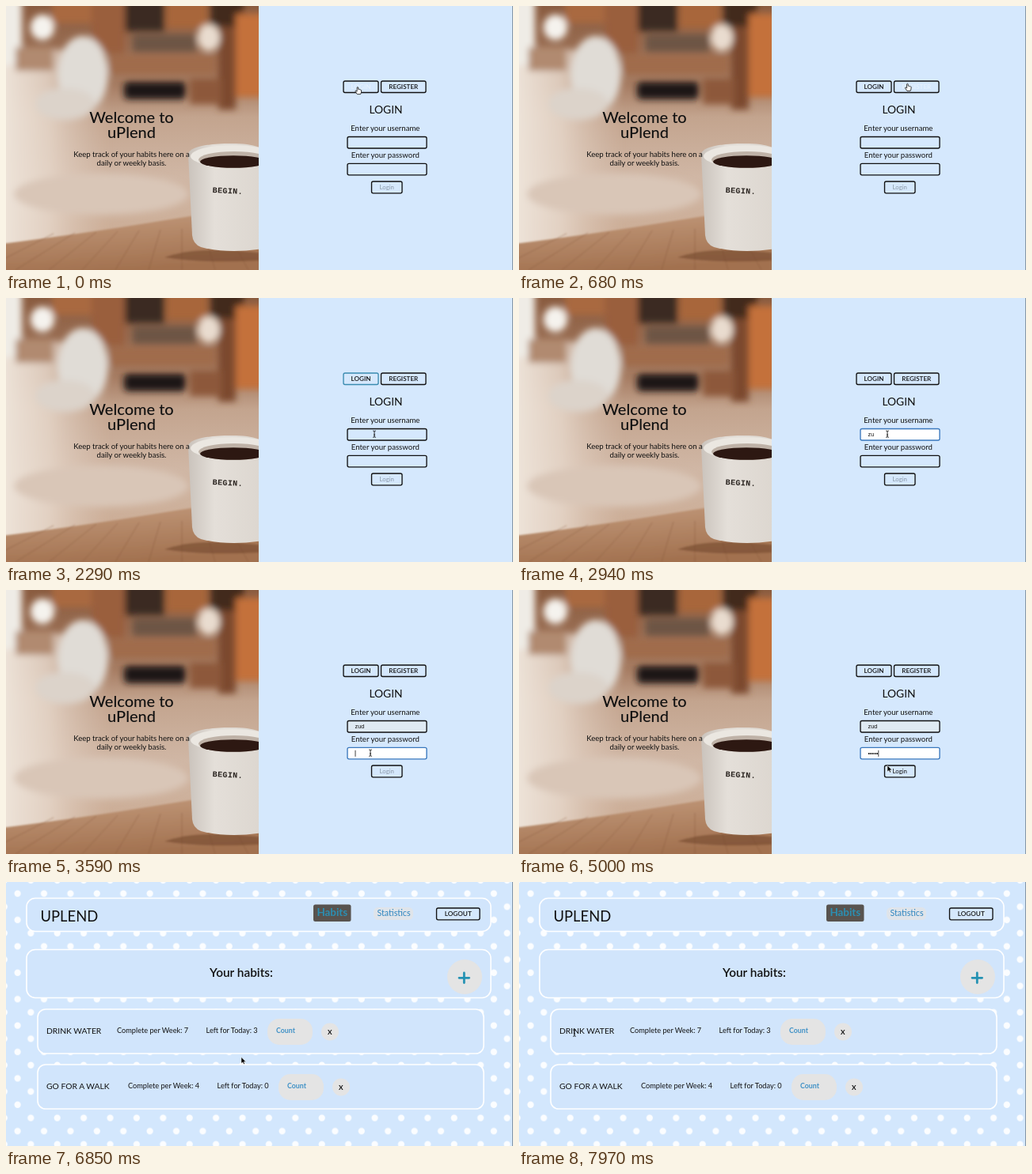
Write an HTML page that moves like this. It is 640 px wide and 334 px high and loops after 8 s.

```html
<!DOCTYPE html>
<html lang="en">
<head>
<meta charset="utf-8">
<title>Habit tracker</title>
<style>
  html, body { margin: 0; width: 100%; height: 100%; overflow: hidden; background: #d5e8fd; }
  svg { display: block; width: 100%; height: 100%; }
  text { font: 9.6px Lato, sans-serif; fill: #111; white-space: pre; }
  .mid { text-anchor: middle; }
  .medium { font-weight: 500; }
  .semi { font-weight: 600; }
  .bold { font-weight: 700; }
  .box { fill: #d5e8fd; stroke: #111; stroke-width: 1.35; }
  .card { fill: #d1e5fc; stroke: #fff; stroke-width: 1.6; }
  .chip { fill: #e4e4e4; }
  .mug { font: 700 10px "Liberation Mono", monospace; letter-spacing: .4px; fill: #29231f; }
  .value { font: 7.3px "Liberation Sans", sans-serif; }
</style>
</head>
<body>
<svg id="stage" viewBox="0 0 640 334" preserveAspectRatio="none"></svg>
<script>
const LOOP = 8000;
const stage = document.getElementById('stage');

const text = (x, y, str, size = 9.6, cls = 'mid', extra = '') =>
  `<text x="${x}" y="${y}" class="${cls}" style="font-size:${size}px;${extra}">${str}</text>`;
const rect = (x, y, w, h, r, cls, extra = '') =>
  `<rect x="${x}" y="${y}" width="${w}" height="${h}" rx="${r}" class="${cls}" ${extra}/>`;
const patch = (x, y, w, h, fill, r = 0) => rect(x, y, w, h, r, '', `fill="${fill}"`);
const oval = (x, y, rx, ry, fill) => `<ellipse cx="${x}" cy="${y}" rx="${rx}" ry="${ry}" fill="${fill}"/>`;
const group = (id, body, extra = '') => `<g id="${id}" ${extra}>${body}</g>`;
const button = (id, x, y, w, h, label, size, cls) =>
  group(id, rect(x, y, w, h, 2, 'box') + text(x + w / 2, y + h / 2 + 2.8, label, size, cls));
const field = (id, y) =>
  group(id, rect(431, y, 100, 14.5, 2, 'box') +
    `<text x="440.5" y="${y + 9.7}" class="value"></text>` +
    `<path class="caret" d="M0 ${y + 3.5}v8" stroke="#111" stroke-width=".8"/>`);

const defs = `<defs>
  <linearGradient id="room" x2="0" y2="1">
    <stop offset="0" stop-color="#8a5c40"/><stop offset=".3" stop-color="#a67c62"/>
    <stop offset=".42" stop-color="#c3a48e"/><stop offset=".65" stop-color="#d0b7a5"/>
    <stop offset="1" stop-color="#c9a78d"/>
  </linearGradient>
  <linearGradient id="haze">
    <stop offset="0" stop-color="#efe6dc"/><stop offset=".45" stop-color="#e6d7ca" stop-opacity=".85"/>
    <stop offset="1" stop-color="#dcc7b7" stop-opacity="0"/>
  </linearGradient>
  <linearGradient id="wood" x2=".3" y2="1">
    <stop offset="0" stop-color="#c39b7d"/><stop offset="1" stop-color="#a2714f"/>
  </linearGradient>
  <linearGradient id="china"><stop offset="0" stop-color="#cac3bc"/>
    <stop offset=".35" stop-color="#e4dfd9"/><stop offset="1" stop-color="#dcd6cf"/></linearGradient>
  <filter id="soft" x="-20%" y="-20%" width="140%" height="140%"><feGaussianBlur stdDeviation="4.5"/></filter>
  <filter id="slight"><feGaussianBlur stdDeviation="1.2"/></filter>
  <clipPath id="half"><path d="M0 0H319V334H0Z"/></clipPath>
  <pattern id="dots" x="6" y="6" width="33.4" height="33.4" patternUnits="userSpaceOnUse">
    <circle cx="8.6" cy="8.6" r="4.1" fill="#fbfdff"/><circle cx="25.3" cy="25.3" r="4.1" fill="#fbfdff"/>
  </pattern>
</defs>`;

const grain = Array.from({ length: 9 }, (_, i) =>
  `<path d="M${i * 42 - 30} 334L${60 + i * 27} ${288 - i}" stroke="#815235" stroke-opacity=".45"/>`).join('');

const photo = `<g clip-path="url(#half)">${patch(0, 0, 319, 334, 'url(#room)')}
  <g filter="url(#soft)">
    ${patch(-10, 55, 140, 290, 'url(#haze)')}
    ${patch(-10, -10, 30, 85, '#efece6')}${oval(46, 27, 15, 16, '#f5f3ee')}
    ${patch(58, -10, 52, 32, '#a9693f')}${patch(12, 52, 48, 30, '#b18a70')}
    ${patch(108, -10, 42, 70, '#9a5f3c')}${patch(150, -10, 50, 42, '#3a2a23')}
    ${patch(202, -10, 52, 38, '#a8663a')}${patch(160, 36, 80, 22, '#6d5545')}
    ${patch(258, -10, 42, 36, '#43291d')}${patch(268, 26, 22, 105, '#7c4a2d')}
    ${patch(290, 10, 40, 105, '#c4713a')}${oval(256, 40, 14, 17, '#e9dccf')}
    ${patch(130, 62, 135, 24, '#a06c4c')}${patch(149, 96, 78, 22, '#1c1613', 5)}
    ${patch(232, 92, 40, 32, '#8d583a')}
    ${oval(97, 86, 32, 48, '#e0dcd6')}${oval(75, 124, 38, 20, '#dcd3ca')}
    ${oval(120, 238, 110, 26, '#d9c6b7')}
  </g>
  <g filter="url(#slight)"><path d="M-5 301Q80 290 145 280L245 264L325 268V338H-5Z" fill="url(#wood)"/>${grain}
    <path d="M200 318Q240 303 319 312V322Q250 326 200 318Z" fill="#74482e" opacity=".6"/></g>
  <path d="M230 187C232 178 256 174 284 174C304 174 314 176 325 181V307Q280 314 246 305Q236 301 235 290Z" fill="url(#china)"/>
  ${oval(286, 190, 53, 14, '#ebe7e1')}${oval(288, 194.5, 45, 10.5, '#bfb2a7')}${oval(287, 197, 42, 7.8, '#2d1812')}
  <text x="260.5" y="236" class="mug" transform="rotate(3 260 236)">BEGIN.</text>
</g>` +
  text(158.5, 147.5, 'Welcome to', 20, 'mid medium') + text(158.5, 166.5, 'uPlend', 20, 'mid medium') +
  text(158.5, 191, 'Keep track of your habits here on a') + text(158.5, 202, 'daily or weekly basis.');

const tabs = group('tabs',
  button('loginTab', 426, 95, 44, 14.5, 'LOGIN', 8.1, 'mid semi') +
  button('registerTab', 473.5, 95, 56.5, 14.5, 'REGISTER', 8.1, 'mid semi'));

const loginForm = group('loginForm',
  text(479.5, 135.6, 'LOGIN', 13.8) +
  text(478.8, 158, 'Enter your username') + field('user', 165.5) +
  text(478.8, 192, 'Enter your password') + field('pass', 199.3) +
  button('submit', 461.5, 222, 38.5, 14.8, 'Login', 7.8, 'mid'));

const small = s => `<tspan style="font-size:12.8px">${s}</tspan>`;
const registerForm = group('registerForm',
  text(479.5, 118.8, `C${small('REATE AN ')}A${small('CCOUNT')}`, 15.5) +
  ['Your new username', 'Create a password', 'Confirm your password'].map((label, i) =>
    text(479, 141 + i * 33.9, label) + rect(431, 148.4 + i * 33.9, 100, 14.5, 2, 'box')).join('') +
  rect(445.5, 239, 70.5, 14.8, 2, 'box') +
  text(480.8, 249, 'Create Account', 7.8, 'mid', 'fill:#8b99a8'));

const habitRow = (y, shift, name, weekly, left) =>
  rect(40, y, 563, 56, 10, 'card') +
  text(51, y + 31, name, 10.3, '') +
  text(140 + shift, y + 30, `Complete per Week: ${weekly}`, 9.2, '') +
  text(252.5 + shift, y + 30, `Left for Today: ${left}`, 9.2, '') +
  rect(330 + shift, y + 12, 57, 33, 15, 'chip') +
  text(341 + shift, y + 30, 'Count', 8.8, 'bold', 'fill:#3f91c6') +
  `<circle cx="${409 + shift}" cy="${y + 28.5}" r="11" class="chip"/>` +
  text(408.7 + shift, y + 31.5, 'X', 8.3, 'mid bold');

const app = group('app',
  patch(0, 0, 640, 334, '#d3e7fd') + patch(0, 0, 640, 334, 'url(#dots)') +
  rect(26, 20.5, 586, 42, 11, 'card') + rect(26, 85.5, 586, 61, 11, 'card') +
  text(43.5, 50, 'UPLEND', 18.4, '') +
  patch(388, 28.5, 47.5, 21.5, '#58534f', 2.5) + text(411.8, 43.2, 'Habits', 13.4, 'mid bold', 'fill:#2b8fb3') +
  rect(464, 32, 50, 16, 6, 'chip', 'opacity=".75"') + text(489.5, 43, 'Statistics', 10.7, 'mid', 'fill:#2f86c0') +
  button('logout', 543.5, 33, 54.5, 14.8, 'LOGOUT', 8.2, 'mid semi') +
  text(297, 120.3, 'Your habits:', 15.4, 'mid semi') +
  '<circle cx="579" cy="120" r="22" class="chip"/>' +
  '<path d="M572 121.3h12.6M578.3 115v12.6" stroke="#2492b3" stroke-width="2.8" stroke-linecap="round"/>' +
  group('habits', habitRow(161, 0, 'DRINK WATER', 7, 3) + habitRow(231, 14, 'GO FOR A WALK', 4, 0)));

// Pointer shapes, each with its hot spot at 0,0.
const pointers = group('pointer',
  group('arrow', '<path d="M0 0V8L1.9 6.3 3.2 9 4.5 8.4 3.3 5.8H5.8Z" fill="#000" stroke="#fff" stroke-width=".5"/>') +
  group('hand', '<path d="M-.9 -3V2.2L-2.2 1.2Q-3.6 1.2-2.8 2.5L-.6 5.6H3.6Q4.8 3.5 4.6 .7Q4 -.4 3.2 0Q2.7 -.9 1.9 -.3Q1.3 -1 .7 -.6V-3Q0-4.2-.9-3Z" fill="#fff" stroke="#111" stroke-width=".8"/>') +
  group('beam', '<path d="M-1.8-4Q0-4 0-3Q0-4 1.8-4M0-3V3.5M-1.8 4.3Q0 4.3 0 3.3Q0 4.3 1.8 4.3M-1 1.2H1" fill="none" stroke="#111" stroke-width=".9"/>'));

stage.innerHTML = defs + patch(0, 0, 640, 334, '#d5e8fd') + photo + tabs + loginForm + registerForm + app +
  '<path d="M639.5 0V334" stroke="#6f7f90" stroke-width=".8"/>' + pointers;

const $ = id => document.getElementById(id);
const show = (id, on) => $(id).style.display = on ? '' : 'none';
const between = (t, a, b) => t >= a && t < b;

const CLICK = { register: 880, login: 1650, user: 2400, pass: 3530, submit: 5380, loaded: 5880 };
const USER_NAME = 'zud', TAB_FOCUS = '#3a8bb0', FIELD_FOCUS = '#3a78bd';

// time, x, y, pointer shape from that time on
const path = [
  [0, 444, 106, 'hand'], [350, 444, 106, 'hand'], [550, 476, 103, 'hand'], [780, 500, 101, 'hand'],
  [CLICK.register, 500, 101, 'arrow'], [980, 500, 101, 'arrow'], [1240, 455, 100, 'arrow'],
  [1400, 448, 89, 'hand'], [CLICK.login, 448, 88, 'arrow'], [1850, 448, 90, 'arrow'],
  [2200, 465, 172, 'beam'], [3100, 465, 172, 'beam'], [3430, 460, 206, 'beam'],
  [4550, 460, 206, 'beam'], [4900, 465, 222, 'arrow'], [5040, 465, 222, 'hand'],
  [5200, 477, 229, 'hand'], [CLICK.submit, 477, 229, 'arrow'], [6150, 477, 229, 'arrow'],
  [6800, 300, 222, 'arrow'], [7550, 70, 191, 'beam'], [LOOP, 70, 191, 'beam']
];

function movePointer(t) {
  const i = path.findIndex(p => p[0] > t) - 1;
  const [t0, x0, y0, shape] = path[i], [t1, x1, y1] = path[i + 1];
  const u = (t - t0) / (t1 - t0), k = u * u * (3 - 2 * u);
  $('pointer').setAttribute('transform', `translate(${x0 + (x1 - x0) * k} ${y0 + (y1 - y0) * k})`);
  for (const id of ['arrow', 'hand', 'beam']) show(id, id === shape);
}

function styleTab(id, focused, hovered) {
  const [box, label] = $(id).children;
  box.style.stroke = focused ? TAB_FOCUS : '';
  label.style.fill = hovered ? '#e6f1fd' : '';
}

function styleField(id, value, focused, since) {
  const [box, label, caret] = $(id).children;
  label.textContent = value;
  box.style.stroke = focused ? FIELD_FOCUS : '';
  box.style.fill = focused ? '#fff' : value ? '#dfeaf3' : '';
  caret.style.display = focused && since % 1000 < 500 ? '' : 'none';
  const width = value ? label.getComputedTextLength() : 0;
  caret.setAttribute('transform', `translate(${441 + width} 0)`);
}

function render(t) {
  const registering = between(t, CLICK.register, CLICK.login);
  const inApp = t >= CLICK.submit;
  show('registerForm', registering);
  show('loginForm', !registering);
  show('app', inApp);
  show('habits', t >= CLICK.loaded);
  $('tabs').setAttribute('transform', `translate(0 ${registering ? -17 : 0})`);

  styleTab('loginTab', between(t, CLICK.login, CLICK.user), t < 480 || between(t, 1400, CLICK.login));
  styleTab('registerTab', registering, between(t, 480, CLICK.register));

  const typed = (start, step, max) => Math.max(0, Math.min(max, Math.floor((t - start) / step) + 1));
  const name = USER_NAME.slice(0, typed(2700, 150, 3));
  const secret = '•'.repeat(typed(3850, 130, 5));
  styleField('user', name, between(t, CLICK.user, CLICK.pass), t - CLICK.user);
  styleField('pass', secret, between(t, CLICK.pass, CLICK.submit), t - CLICK.pass);
  $('submit').children[1].style.fill = name && secret ? '#111' : '#8b99a8';

  movePointer(t);
}

const start = performance.now();
function tick() {
  render((performance.now() - start) % LOOP);
  requestAnimationFrame(tick);
}
tick();
</script>
</body>
</html>
```
